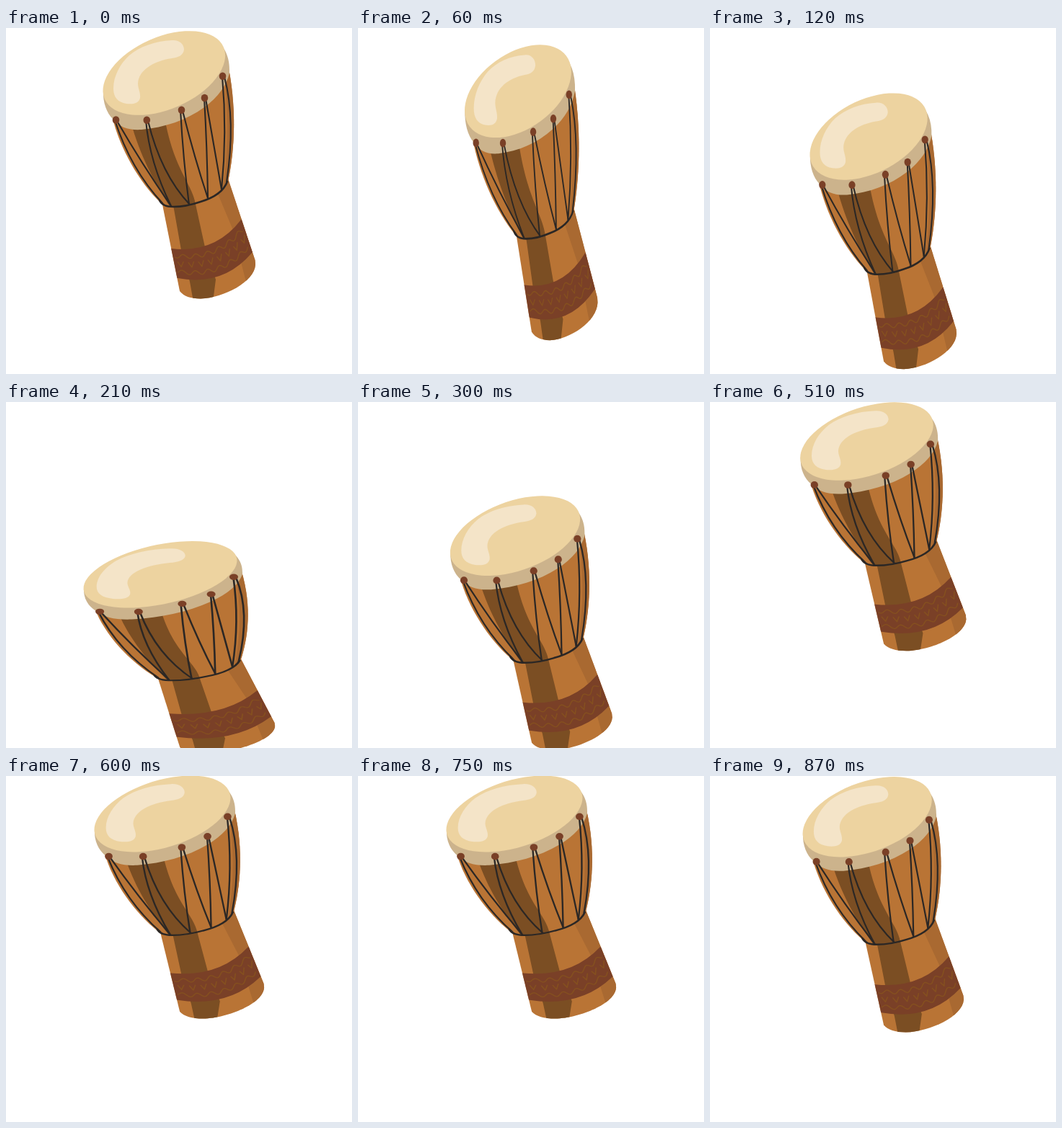
An HTML page with a canvas that plays this animation: 480x480 px, repeating every 0.9 s.

```html
<!DOCTYPE html>
<html lang="en">
<head>
<meta charset="utf-8">
<title>Bouncing drum</title>
<style>
  html, body { margin: 0; width: 100%; height: 100%; overflow: hidden; background: #fff; }
  canvas { display: block; width: 480px; height: 480px; }
</style>
</head>
<body>
<canvas id="stage" width="480" height="480"></canvas>
<script>
const ctx = document.getElementById('stage').getContext('2d');
const LOOP = 900, STEP = 30, IMPACT = 225, MID = 240;

const WOOD = '#b97435', SHADE = '#a96931', DARK = '#7b4e23', BAND = '#7a4027';
const SKIN = '#edd3a0', RIM = '#ccb38c', SHINE = '#f4e4c8', ROPE = '#2b2725', PATTERN = '#85501f';

// The bounce is symmetric in time: [ms from impact, horizontal scale, vertical offset]
const POSES = [
  [0, 1.26, 141], [15, 1.256, 140], [105, 0.962, 93.5], [165, 0.872, 43.6],
  [225, 1, 0], [255, 1.056, -13.8], [285, 1.088, -20.6], [375, 1.114, -26.4],
  [405, 1.121, -28], [450, 1.121, -28]
];

function slope(i, k) {
  if (i === 0 || i >= POSES.length - 2) return 0;
  const [a, b, c] = [POSES[i - 1], POSES[i], POSES[i + 1]];
  const h0 = b[0] - a[0], h1 = c[0] - b[0];
  return (h0 * (c[k] - b[k]) / h1 + h1 * (b[k] - a[k]) / h0) / (h0 + h1);
}

// Cubic Hermite interpolation through the poses
function pose(d, k) {
  let i = 0;
  while (i < POSES.length - 2 && d > POSES[i + 1][0]) i++;
  const a = POSES[i], b = POSES[i + 1], h = b[0] - a[0], s = (d - a[0]) / h;
  const blend = s * s * (3 - 2 * s);
  return a[k] + (b[k] - a[k]) * blend
    + h * s * (1 - s) * ((1 - s) * slope(i, k) - s * slope(i + 1, k));
}

function fill(color, path) {
  ctx.fillStyle = color;
  ctx.fill(new Path2D(path));
}

function stroke(color, width, path) {
  ctx.strokeStyle = color;
  ctx.lineWidth = width;
  ctx.stroke(new Path2D(path));
}

function oval(color, x, y, rx, ry, angle = 0) {
  ctx.fillStyle = color;
  ctx.beginPath();
  ctx.ellipse(x, y, rx, ry, angle, 0, Math.PI * 2);
  ctx.fill();
}

function clipped(path, draw) {
  ctx.save();
  ctx.clip(new Path2D(path));
  draw();
  ctx.restore();
}

const quad = (a, b, c, u) => (1 - u) * (1 - u) * a + 2 * u * (1 - u) * b + u * u * c;
const mix = (a, b, v) => a + (b - a) * v;

// Point on the band: u runs across it, v from its top edge to its bottom edge
function bandPoint(u, v) {
  return [
    mix(quad(230, 290, 326, u), quad(238, 301, 341, u), v),
    mix(quad(306, 313, 266, u), quad(347, 359, 312, u), v)
  ];
}

function wave(level, phase) {
  const path = new Path2D();
  for (let u = 0.02; u <= 0.98; u += 0.01) {
    path.lineTo(...bandPoint(u, level + 0.065 * Math.sin(u * 40 + phase)));
  }
  stroke(PATTERN, 1.4, path);
}

function chevrons() {
  const path = new Path2D();
  for (let u = 0.07; u < 0.97; u += 0.125) {
    path.moveTo(...bandPoint(u - 0.03, 0.44));
    path.lineTo(...bandPoint(u, 0.59));
    path.lineTo(...bandPoint(u + 0.035, 0.42));
  }
  stroke(PATTERN, 1.4, path);
}

function drawFoot() {
  const foot = 'M216 240L241 365Q249 375.5 270 375.5C302 374.5 345 352 346 328L345.5 322L308 209Z';
  clipped(foot, () => {
    fill(WOOD, 'M200 200H360V390H200Z');
    fill(DARK, 'M231 240L243 308L255 352L260 380H287L291 349L276 304L262 240Z');
    fill(SHADE, 'M293 228L314 278L334 356L360 340V200H300Z');
    fill(BAND, 'M225 305L230 306Q290 313 326 266L345 260V308L341 312Q301 359 238 347L225 344Z');
  });
  wave(0.24, 0);
  chevrons();
  wave(0.77, 2);
}

function drawBowl() {
  const bowl = 'M147 122C158 168 185 214 214 242Q232 251 257 246Q292 236 308 213'
    + 'C316 175 321 120 309 56Z';
  clipped(bowl, () => {
    fill(WOOD, 'M130 40H330V260H130Z');
    fill(DARK, 'M173 130C187 180 206 214 230 252H264C262 218 236 205 221 130Z');
    fill(SHADE, 'M302 60Q313 145 300 230H330V50Z');
  });
  stroke(ROPE, 2.6, 'M213 239Q217 248 232 248Q250 248 270 241Q300 232 307 213');
}

function drawHead() {
  fill(RIM, 'M135 86C134 104 140 118 148 126C158 138 170 142 188 141C220 138 250 128 275 110'
    + 'C294 96 306 80 310 62C311 40 303 24 287 12.5Z');
  oval(SKIN, 219.3, 62.5, 90, 50, -0.414);
  fill(SHINE, 'M230 17C240 16 247 22 247 30C246 38 239 41 230 42C205 46 184 58 183 77'
    + 'C183 84 187 90 186 97C184 105 176 106 167 105C155 103 149 96 149 84'
    + 'C149 67 158 50 171 38C185 26 207 18 230 17Z');
}

function drawStrings() {
  const strands = [
    'M151 128Q173 196 217 243', 'M154 129Q188 188 229 247',
    'M194 128Q199 186 229 247', 'M197 129Q215 203 255 245',
    'M242 114Q246 185 254 245', 'M245 115Q262 182 280 236',
    'M275 97Q279 165 280 236', 'M277 98Q288 162 299 224',
    'M300 67Q307 145 299 224', 'M303 68Q319 128 306 214'
  ];
  strands.forEach(path => stroke(ROPE, 2.1, path));
  [[152.5, 127.5], [195.3, 127.7], [243.5, 113.7], [275.5, 97], [300.5, 66.8]]
    .forEach(([x, y]) => oval(BAND, x, y, 4.8, 5.3));
}

function render(now) {
  const time = Math.floor((now % LOOP) / STEP) * STEP;
  const gap = Math.abs(time - IMPACT);
  const d = Math.min(gap, LOOP - gap);
  const scaleX = pose(d, 1);
  const scaleY = 1 - 0.81 * (scaleX - 1);

  ctx.setTransform(1, 0, 0, 1, 0, 0);
  ctx.fillStyle = '#fff';
  ctx.fillRect(0, 0, 480, 480);
  ctx.translate(MID, MID + pose(d, 2));
  ctx.scale(scaleX, scaleY);
  ctx.translate(-MID, -MID);
  ctx.lineCap = ctx.lineJoin = 'round';

  drawFoot();
  drawBowl();
  drawHead();
  drawStrings();
}

const start = performance.now();
function tick() {
  render(performance.now() - start);
  requestAnimationFrame(tick);
}
tick();
</script>
</body>
</html>
```
